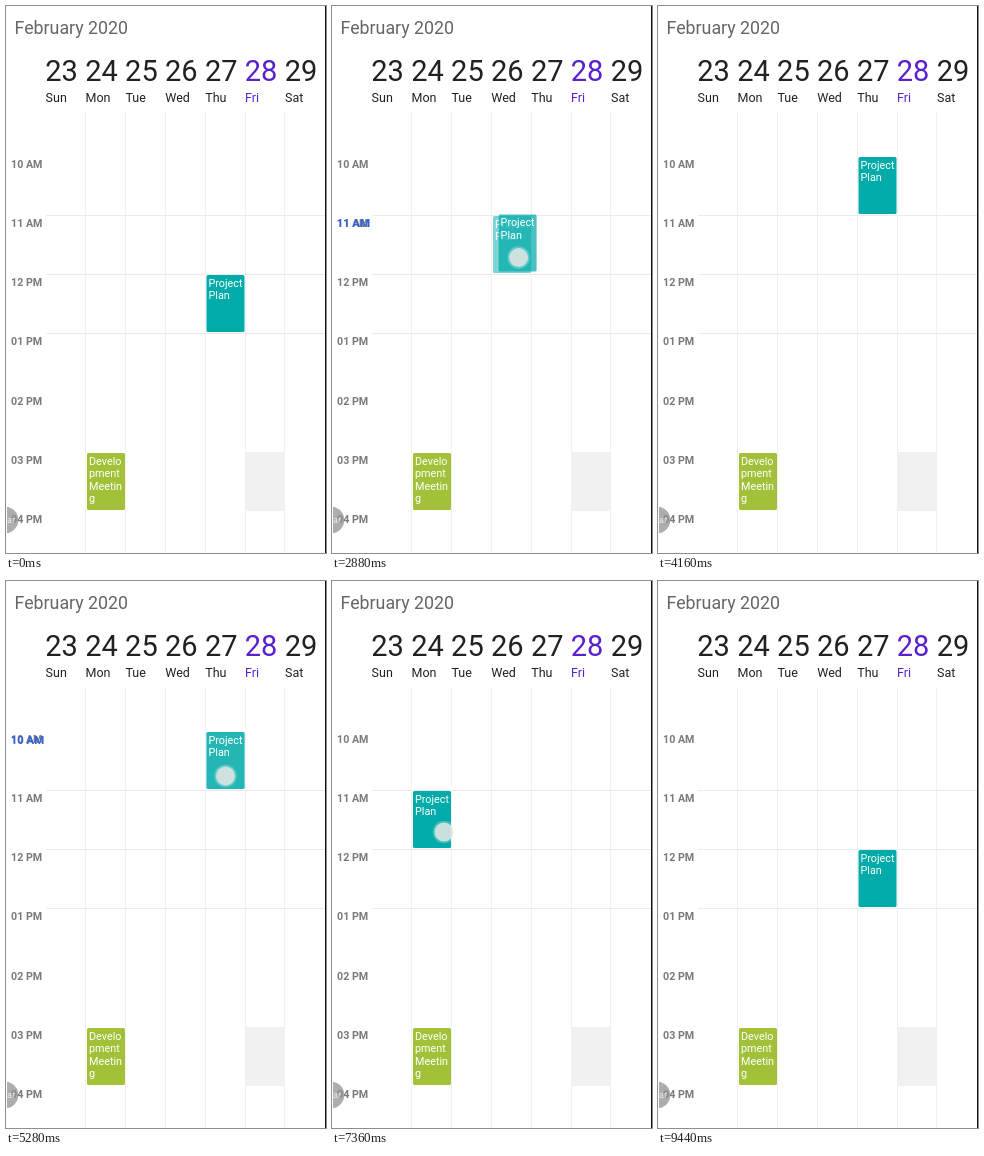
Animation of 320 by 547 pixels, one loop 9600 ms. Source, as an HTML page with a canvas:

```html
<!DOCTYPE html>
<html lang="en">
<head>
<meta charset="utf-8">
<title>Week calendar</title>
<style>
  html, body { margin: 0; width: 100%; height: 100%; overflow: hidden; background: #fff; }
  canvas { display: block; width: 320px; height: 547px; }
</style>
</head>
<body>
<canvas id="stage"></canvas>
<script>
const W = 320, H = 547, LOOP = 9600, STEP = 160;
const HOUR = 59.2, TOP = 150.4, COL = 39.9;   // TOP is 10 AM
const TEAL = '#00aba9', LIME = '#a2c139', PURPLE = '#5a20cd';

const canvas = document.getElementById('stage');
const dpr = window.devicePixelRatio || 1;
canvas.width = W * dpr;
canvas.height = H * dpr;
const ctx = canvas.getContext('2d');
ctx.scale(dpr, dpr);

// Each drag: finger down, card lifted, card dropped, finger up,
// grab point inside the card, and the path as [time, x, y].
const drags = [
  { down: 160, lift: 480, drop: 1760, up: 1760, grab: [19, 43],
    path: [[480, 200.5, 269], [1280, 163, 217.5], [1440, 159, 215], [1600, 160, 211]] },
  { down: 2240, lift: 2560, drop: 4000, up: 4160, grab: [20, 43],
    path: [[2720, 161, 210], [2880, 166.6, 208.6], [3840, 200.5, 152]] },
  { down: 4640, lift: 5120, drop: 6720, up: 6720, grab: [19, 44],
    path: [[5440, 200.5, 151], [6080, 102, 211], [6560, 82, 211]] },
  { down: 7200, lift: 7840, drop: 9120, up: 9280, grab: [31, 41],
    path: [[7760, 81, 210], [8800, 200, 268]] }
];
// Resting places of the card before each drag and after the last one.
const slots = [[200.5, 269], [161, 210], [200.5, 151], [81, 210], [200.5, 269]];

function along(path, t) {
  if (t <= path[0][0]) return path[0].slice(1);
  for (let i = 1; i < path.length; i++) {
    const [t0, x0, y0] = path[i - 1], [t1, x1, y1] = path[i];
    if (t < t1) {
      const k = (t - t0) / (t1 - t0);
      return [x0 + (x1 - x0) * k, y0 + (y1 - y0) * k];
    }
  }
  return path[path.length - 1].slice(1);
}

function rect(x, y, w, h, color) {
  ctx.fillStyle = color;
  ctx.fillRect(x, y, w, h);
}

function text(str, x, y, size, color, weight = 400) {
  ctx.font = `${weight} ${size}px Roboto, sans-serif`;
  ctx.fillStyle = color;
  ctx.fillText(str, x, y);
}

function disc(x, y, r, color) {
  ctx.fillStyle = color;
  ctx.beginPath();
  ctx.arc(x, y, r, 0, Math.PI * 2);
  ctx.fill();
}

function card(x, y, color, lines, alpha = 1) {
  ctx.globalAlpha = alpha;
  ctx.fillStyle = color;
  ctx.beginPath();
  ctx.roundRect(x, y, 38, 57, 1.5);
  ctx.fill();
  ctx.globalAlpha = 1;
  lines.forEach((s, i) => text(s, x + 2, y + 11.8 + i * 12.4, 10.8, '#fff'));
}

const project = (x, y, alpha) => card(x, y, TEAL, ['Project', 'Plan'], alpha);
const two = n => String(n).padStart(2, '0');
const hourName = h => two(h > 12 ? h - 12 : h) + (h < 12 ? ' AM' : ' PM');

function backdrop() {
  rect(0, 0, W, H, '#fff');
  text('February 2020', 8.5, 28, 17.8, '#666');
  ['Sun', 'Mon', 'Tue', 'Wed', 'Thu', 'Fri', 'Sat'].forEach((day, i) => {
    const x = 39.5 + i * COL, color = day === 'Fri' ? PURPLE : '#212121';
    text(23 + i, x - 0.2, 75.3, 29, color);
    text(day, x + 0.1, 96, 12.5, color);
    if (i) rect(Math.floor(x), 106, 1, H - 106, '#f1f1f1');
  });
  for (const y of [209, 268, 327]) rect(40, y, 279, 1, '#ebebeb');
  rect(239, 446, 40, 59, '#f1f1f1');
  for (let h = 10; h <= 16; h++)
    text(hourName(h), 5, TOP + (h - 10) * HOUR + 11.3, 10.7, '#7a7a7a', 700);
  card(81, 447, LIME, ['Develo', 'pment', 'Meetin', 'g']);
  disc(-1, 514, 13.3, 'rgba(145,145,145,.75)');
  text('ar', 1, 517, 9, '#eee');
  rect(0, 500, 1, 28, '#fff');
  rect(319, 0, 1, H, '#111');
}

function timeLabel(y) {
  const min = Math.round((y - TOP) / HOUR * 60) + 600;
  const h = Math.floor(min / 60), m = min % 60;
  const onHour = Math.abs(y - TOP - Math.round((y - TOP) / HOUR) * HOUR) < 1.5;
  const label = onHour ? hourName(Math.round(min / 60))
    : two(h > 12 ? h - 12 : h) + ':' + two(m);
  text(label, 4.7, y + 12, 11.4, '#2f62d9', 700);
}

function draw(t) {
  backdrop();
  const slot = slots[drags.filter(d => t >= d.drop).length];
  const drag = drags.find(d => t >= d.down && t < d.up);
  if (!drag) return project(...slot);

  const [x, y] = along(drag.path, t);
  if (t >= drag.lift && t < drag.drop) {
    project(...slot, 0.5);
    project(x, y, 0.72);
    timeLabel(along(drag.path, t - 45)[1]);
  } else {
    project(...slot);
  }
  const fx = x + drag.grab[0], fy = y + drag.grab[1];
  disc(fx, fy, 11.3, 'rgba(255,255,255,.25)');
  disc(fx, fy, 9.5, 'rgba(230,232,228,.82)');
}

const start = performance.now();
function frame() {
  const t = (performance.now() - start) % LOOP;
  draw(Math.floor(t / STEP) * STEP);
  requestAnimationFrame(frame);
}
frame();
</script>
</body>
</html>
```
